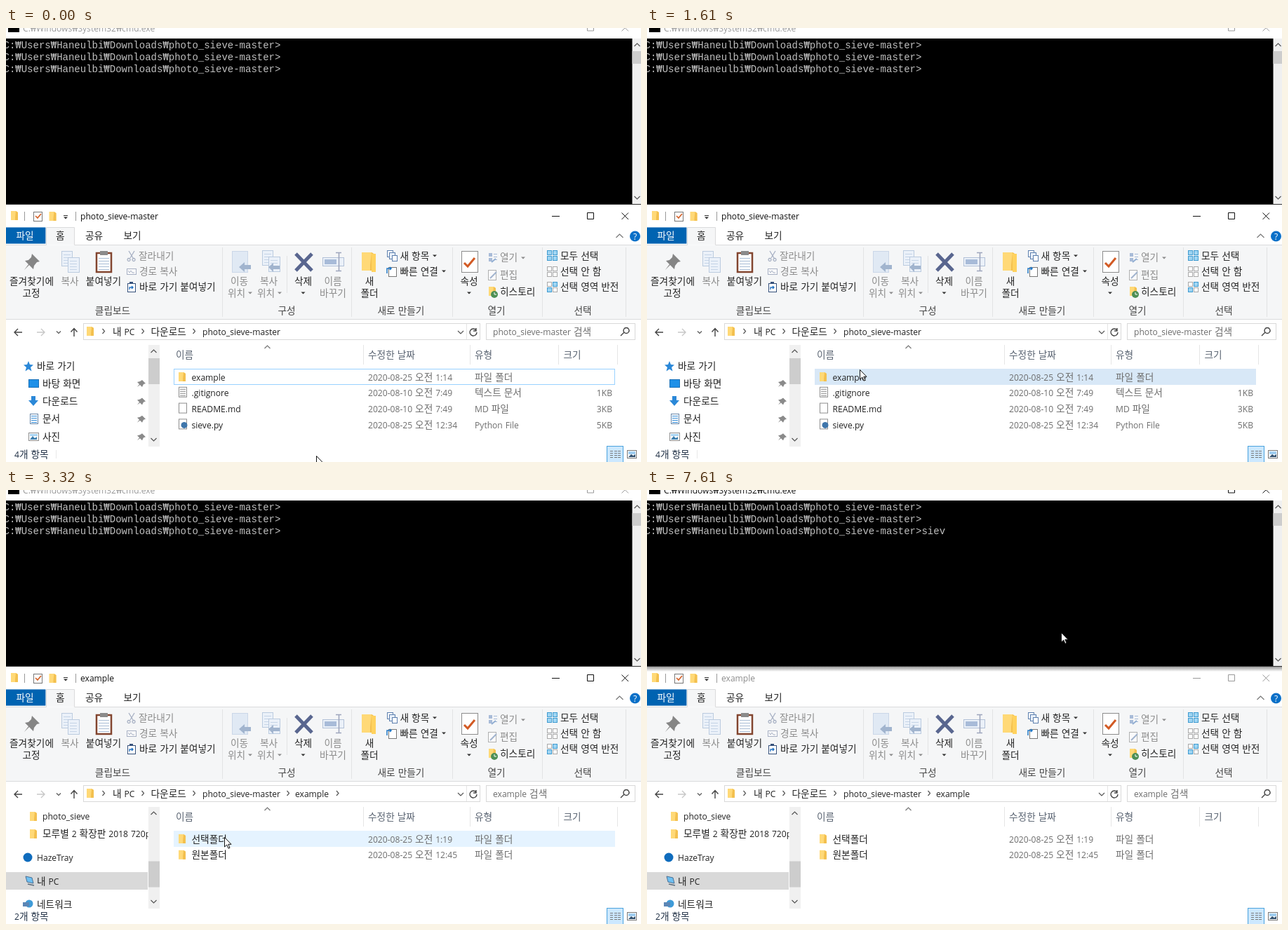
Animation of 905 by 619 pixels, one loop 7.99 s. Source, as an HTML page:

```html
<!DOCTYPE html>
<html lang="ko">
<head>
<meta charset="utf-8">
<title>photo_sieve</title>
<style>
html, body { margin: 0; width: 100%; height: 100%; overflow: hidden; background: #fff; }
svg { display: block; width: 905px; height: 619px; }
text { font: 12.1px "Open Sans", "Noto Sans", "Noto Sans CJK KR", sans-serif; word-spacing: .8px; white-space: pre; }
.k { font: 13.7px "Noto Sans CJK KR", "Noto Sans CJK", sans-serif; }
.con { font: 14px "Liberation Mono", monospace; word-spacing: 0; }
.won { font: 13.95px "DejaVu Sans Mono", monospace; }
text.dim { fill: #8b8b8b; }
g.dim { opacity: .55; }
.armed text.dim { fill: #222; }
.armed g.dim { opacity: 1; }
</style>
</head>
<body>
<svg id="stage" viewBox="0 0 905 619" xmlns="http://www.w3.org/2000/svg"></svg>
<script>
const stage = document.getElementById('stage');
const LOOP = 7990, STEP = 75;
const GRAY = '#6d6d6d', LINE = '#dadbdc', BLUE = '#2b88d8';

// Markup helpers
const R = (x, y, w, h, fill, stroke = 'none', extra = '') =>
  `<rect x="${x}" y="${y}" width="${w}" height="${h}" fill="${fill}" stroke="${stroke}" ${extra}/>`;
const P = (d, stroke = '#333', w = 1, fill = 'none') =>
  `<path d="${d}" stroke="${stroke}" stroke-width="${w}" fill="${fill}"/>`;
const C = (x, y, r, fill) => `<circle cx="${x}" cy="${y}" r="${r}" fill="${fill}"/>`;
const T = (x, y, s, fill = '#222', anchor = 'start', cls = '') =>
  `<text x="${x}" y="${y}" fill="${fill}" text-anchor="${anchor}" class="${cls}">` +
  s.replace(/[가-힣]+/g, '<tspan class="k">$&</tspan>') + '</text>';
const M = (x, y, s, cls = '') => T(x, y, s, '#222', 'middle', cls);
const G = (id, body) => `<g id="${id}">${body}</g>`;
const dim = body => `<g class="dim">${body}</g>`;
const vline = (x, y1, y2, c = '#e2e3e4') => P(`M${x + .5} ${y1}V${y2}`, c);
const chev = (x, y, dx, dy, c = '#555', w = 1.2) => dy
  ? P(`M${x - dx} ${y - dy}L${x} ${y}L${x + dx} ${y - dy}`, c, w)
  : P(`M${x - dx} ${y - 3.5}L${x} ${y}L${x - dx} ${y + 3.5}`, c, w);
const drop = (x, y, c = '#333') => P(`M${x - 3} ${y - 1.5}h6l-3 3z`, 'none', 0, c);
const folder = (x, y, s = 1) => `<g transform="translate(${x} ${y}) scale(${s})">` +
  P('M0 0H7L10 2V13H0Z', 'none', 0, '#ffd977') + P('M7 0L10 2V13H6V9Z', 'none', 0, '#f3c04f') + '</g>';
const page = (x, y, w, h, c = '#9a9a9a', fill = '#fff') =>
  R(x + .5, y + .5, w, h, fill, c);
const rules = (x, y, w, n, gap, c) =>
  P(Array.from({ length: n }, (_, i) => `M${x} ${y + i * gap + .5}h${w}`).join(''), c);
const sheets = (x, y) => page(x, y, 15, 21, '#8da9cc', '#e4eefb') + rules(x + 3, y + 5, 10, 4, 4, '#9fb9da') +
  page(x + 9, y + 9, 16, 21, '#8da9cc', '#e4eefb') + rules(x + 12, y + 14, 10, 4, 4, '#9fb9da');
const tiles = (y, colors) => colors.map((c, i) =>
  R(771.5 + i % 2 * 8, y + .5 + (i >> 1) * 8, 6, 6, c, c === '#fff' ? '#a9a9a9' : '#3f9bd0')).join('');
const winButtons = (c, dy) => P(`M828.5 ${263.5 + dy}h9v9h-9zM877.5 ${263.5 + dy}l9.5 9.5m0 -9.5l-9.5 9.5`, c);

function consoleWindow() {
  const head = c => T(24, 4.5, 'C:₩Windows₩System32₩cmd.exe', c) + winButtons(c, -268.5);
  return R(0, 0, 905, 15, '#fff') + R(3, -6, 16, 12, '#000') +
    G('headOff', head('#999')) + G('headOn', head('#111')) +
    R(0, 15, 905, 236.5, '#000') + R(892.5, 15, 13, 236.5, '#f0f0f0') + R(892.5, 33, 13, 18, '#cdcdcd') +
    chev(899.5, 22, 4, -4) + chev(899.5, 244, 4, 4) +
    [29, 45.5, 62.5].map((y, i) =>
      `<text class="con" x="-3.5" y="${y}" fill="#bfbfbf">` +
      'C:₩Users₩Haneulbi₩Downloads₩photo_sieve-master>'.replace(/₩/g, '<tspan class="won">₩</tspan>') +
      (i === 2 ? '<tspan id="typed"></tspan>' : '') + '</text>').join('') +
    R(391, 62, 8, 3, '#ccc', 'none', 'id="caret"');
}

function titleBar() {
  const name = s => ['On', 'Off'].map(k => G(s + k, T(106, 273, s === 'root' ? 'photo_sieve-master' : 'example',
    k === 'On' ? '#111' : '#8c8c8c'))).join('');
  const buttons = c => P('M778 268.5h11', c) + winButtons(c, 0);
  return folder(7, 261) + vline(26, 262, 275, '#999') + page(39, 262, 12, 13, '#777') +
    P('M42 268l3 3 5-6', '#d4622a', 1.7) + folder(61.5, 262) + P('M82 267.5h6', '#333') + drop(85, 271) +
    vline(99, 262, 275, '#999') + name('root') + name('sub') +
    G('btnOn', buttons('#111')) + G('btnOff', buttons('#999'));
}

function ribbon() {
  const label = '#444';
  let s = R(0, 284.4, 56.4, 23.2, '#0063b1') + T(14.5, 301, '파일', '#fff') +
    R(0, 310, 905, 105, '#f5f6f7') + P('M0 309.5H57.5V284.5H97.5V309.5H905M0 415.5H905', LINE, 1, '#f5f6f7') +
    T(71, 301, '홈') + T(113, 301, '공유') + T(167.5, 301, '보기') +
    chev(874.5, 294, 5, -5, '#777') + C(896.5, 297, 7.5, '#0a70c8') + T(896.5, 301.5, '?', '#fff', 'middle');
  s += [308, 492, 636, 764, 883].map(x => vline(x, 313, 412)).join('') + vline(400, 325, 378);
  s += [['클립보드', 152], ['구성', 400], ['새로 만들기', 563], ['열기', 699], ['선택', 822]]
    .map(([t, x]) => T(x, 408, t, label, 'middle')).join('');

  // Clipboard
  s += P('M37 322L48 333 44 334 40 339 39 344 33 338 26 345 32 337 27 332 32 331 36 327Z', 'none', 0, '#858585') +
    M(36.5, 366, '즐겨찾기에') + M(36, 382.5, '고정') +
    dim(sheets(79, 318)) + M(91, 366, '복사', 'dim') +
    R(129, 321, 21, 27, '#fff', '#82452f', 'stroke-width="2.5"') + R(134, 318, 11, 6, '#8b8b8b') +
    rules(132, 328, 15, 5, 4, '#a9bdd5') + M(139, 366, '붙여넣기') +
    dim(P('M175 318l6 10M183 318l-6 10', '#68789a', 1.3) + P('M175 328.5a2 2 0 1 0 .1 0zM182 328.5a2 2 0 1 0 .1 0z', '#68789a', 1.3)) +
    T(189, 330, '잘라내기', '#222', 'start', 'dim') +
    dim(page(172, 343, 13, 8, '#68789a') + P('M174 346l2 3 2-3 2 3h3', '#68789a')) +
    T(190, 352, '경로 복사', '#222', 'start', 'dim') +
    page(173, 364, 11, 12, '#35507a') + R(176, 362, 5, 3, '#35507a') + P('M176 373v-3h5m-2-2l2 2-2 2', '#1f6fc0', 1.3) +
    T(190, 374, '바로 가기 붙여넣기');

  // Organize
  s += dim(page(322, 318, 22, 30, '#a9bfdd', '#cfdff3') + P('M332 341l8-7v4h9v6h-9v4z', 'none', 0, '#5e7fae')) +
    M(332.5, 366, '이동', 'dim') + M(328.5, 382.5, '위치', 'dim') + dim(drop(348, 378)) +
    dim(sheets(365, 317) + P('M374 341l7-6v4h9v5h-9v4z', 'none', 0, '#5e7fae')) +
    M(374.5, 366, '복사', 'dim') + M(370.5, 382.5, '위치', 'dim') + dim(drop(390, 378)) +
    P('M413 322L436 346M436 322L413 346', '#59668f', 5) + M(423.5, 366, '삭제') + drop(423.5, 378) +
    dim(R(451.5, 327.5, 30, 12, '#e4eefb', '#7c97bd') + R(454, 330, 17, 7, '#6a8cc0') +
      P('M470 320.5h8M474.5 320v26M470 346.5h8', '#59668f', 1.6)) +
    M(466, 366, '이름', 'dim') + M(466, 382.5, '바꾸기', 'dim');

  // New
  s += folder(507, 320, 2) + P('M521 322h6v26h-6z', 'none', 0, '#ffd25f') + M(518, 366, '새') + M(518, 382.5, '폴더') +
    page(543, 317, 8, 9, '#5c7fae') + page(546, 320, 8, 9, '#5c7fae', '#e9f1fa') + page(550, 324, 7, 8, '#5c7fae') +
    T(561.5, 330, '새 항목') + drop(611, 325) +
    page(545, 341, 11, 13, '#777') + P('M543 350v-7h6m-2-2l2 2-2 2', '#1f78c8', 1.5) +
    T(561.5, 352, '빠른 연결') + drop(624, 347);

  // Open
  s += page(649, 318, 23, 30, '#8c8c8c') + P('M653 335l5 5 10-12', '#d25a24', 3) + M(660, 366, '속성') + drop(660, 378) +
    dim(R(688, 321, 5, 5, '#6a8cc0') + R(688, 328, 5, 5, '#6a8cc0') + rules(695, 322, 5, 3, 4, '#6a8cc0') +
      P('M692 334l6-5', '#4276b5', 2)) +
    T(704, 332, '열기', '#222', 'start', 'dim') + dim(drop(737, 328)) +
    `<g opacity=".55">${page(687, 345, 11, 14, '#777')}${P('M690 357l9-9', '#5e7fae', 2)}</g>` +
    T(704, 357, '편집', '#8b8b8b') + folder(688, 369) + C(696, 380, 5, '#4d8f55') + P('M696 377v3h3', '#fff') +
    T(704, 381, '히스토리');

  // Select
  s += tiles(317, ['#9fd5f3', '#9fd5f3', '#9fd5f3', '#9fd5f3']) + T(790, 330, '모두 선택') +
    tiles(340, ['#fff', '#fff', '#fff', '#fff']) + T(790, 352, '선택 안 함') +
    tiles(362, ['#fff', '#9fd5f3', '#9fd5f3', '#fff']) + T(790, 374, '선택 영역 반전');
  return s;
}

function addressBar() {
  const dark = '#444';
  return P('M23 434H12m5-5l-5 5 5 5', dark, 1.4) + P('M44 434h11m-5-5l5 5-5 5', '#c8c8c8', 1.4) +
    chev(75, 435.5, 3, 3) + P('M97 440V429m-4.5 4.5l4.5-5 4.5 5', dark, 1.4) +
    R(110.5, 421.5, 565, 23, '#fff', '#d9d9d9') + vline(656, 422, 444, '#e5e5e5') + folder(115, 426) +
    [140.5, 196.5, 269.5].map(x => chev(x, 432.5, 3, 0)).join('') +
    T(152, 437.5, '내 PC') + T(206.5, 437.5, '다운로드') + T(280, 437.5, 'photo_sieve-master') +
    G('crumb', chev(403.5, 432.5, 3, 0) + T(412, 437.5, 'example')) + G('crumbEnd', chev(474, 432.5, 3, 0)) +
    chev(648, 436, 4, 4) + P('M670 431a5 5 0 1 0 1 3m-1-6v4h-4', dark, 1.4) +
    R(684.5, 421.5, 212, 23, '#fff', '#d9d9d9') +
    G('findRoot', T(694, 437.5, 'photo_sieve-master 검색', GRAY)) + G('findSub', T(694, 437.5, 'example 검색', GRAY)) +
    P('M881 434l-5 5M884 427.5a4 4 0 1 0 .1 0z', dark, 1.4);
}

function fileList() {
  const row = (i, [name, date, type, size = ''], icon) => {
    const y = 502.5 + i * 22.8;
    return icon(i * 22.8) + T(264.5, y, name) + T(516, y, date, GRAY) + T(668, y, type, GRAY) + T(864, y, size, GRAY, 'end');
  };
  const dir = y => folder(246, 491 + y);
  const doc = y => page(246, 489 + y, 11, 14, '#8e8e8e');
  const txt = y => doc(y) + rules(248, 492 + y, 8, 4, 3, '#8e8e8e');
  const py = y => doc(y) + C(254, 498 + y, 4.5, '#3f76ab');
  const name = '#5a6472';
  return R(224, 452, 285, 28, '#d9ebf9', 'none', 'id="headHover"') +
    [509, 661, 787, 871].map(x => vline(x, 452, 480, '#e5e5e5')).join('') + chev(372.5, 453, 4, -4, '#777') +
    T(242, 470.5, '이름', name) + T(516, 470.5, '수정한 날짜', name) + T(668, 470.5, '유형', name) + T(794.5, 470.5, '크기', name) +
    R(239, 486, 629, 23, '#e5f3ff', 'none', 'id="rowHover"') +
    R(239.5, 486.5, 628, 22, 'none', '#99d1ff', 'id="focus"') +
    G('rootFiles', row(0, ['example', '2020-08-25 오전 1:14', '파일 폴더'], dir) +
      row(1, ['.gitignore', '2020-08-10 오전 7:49', '텍스트 문서', '1KB'], txt) +
      row(2, ['README.md', '2020-08-10 오전 7:49', 'MD 파일', '3KB'], doc) +
      row(3, ['sieve.py', '2020-08-25 오전 12:34', 'Python File', '5KB'], py)) +
    G('subFiles', row(0, ['선택폴더', '2020-08-25 오전 1:19', '파일 폴더'], dir) +
      row(1, ['원본폴더', '2020-08-25 오전 12:45', '파일 폴더'], dir));
}

function sidebar() {
  const pin = y => `<g transform="translate(193 ${y})">` + P('M1-5l5 5-3 1-2 4-3-3-4 3 3-4-3-3 4-1z', 'none', 0, '#8a8a8a') + '</g>';
  const quick = P('M32 475l2 5 5 .5-4 3.5 1.5 5.5-4.5-3-4.5 3 1.5-5.5-4-3.5 5-.5z', 'none', 0, BLUE) + T(44, 486.5, '바로 가기') +
    R(32.5, 501.5, 14, 11, '#1e90e8', '#1870b8') + P('M36 525h6v6h4l-7 8-7-8h4z', 'none', 0, BLUE) +
    page(34, 550, 11, 14, '#6886a8') + rules(36, 553, 8, 4, 3, BLUE) +
    page(32, 577, 14, 11, '#8e8e8e') + P('M34 587l4-5 3 3 3-2v4z', 'none', 0, '#3d7fae') + R(34, 579, 11, 3, '#a9d4f2') +
    ['바탕 화면', '다운로드', '문서', '사진'].map((t, i) => T(52, 511.5 + i * 25.4, t) + pin(507 + i * 25.4)).join('');
  const tree = folder(34, 459) + T(52, 470, 'photo_sieve') + folder(34, 484) + T(52, 495, '모루별 2 확장판 2018 720p') +
    C(31, 524, 6.5, '#0f6cbd') + T(44, 528.5, 'HazeTray') +
    R(0, 545, 202, 25, '#d9d9d9') + P('M28 551l9 2 2 8-9-2z', '#4a6e92', 1, '#6ec0f2') + P('M31 562l9 2', '#5b6b7b', 1.5) +
    T(44, 562.5, '내 PC') + C(33, 590, 5.5, '#3f9bd8') + R(24, 588, 9, 6, '#5c86b5') + T(44, 596, '네트워크');
  return '<clipPath id="navClip"><rect y="452" width="202.5" height="147"/></clipPath><g clip-path="url(#navClip)">' +
    G('quick', quick) + G('tree', tree) + '</g>' + R(203, 452, 16, 145, '#f0f0f0') +
    R(203, 471, 16, 37, '#cdcdcd', 'none', 'id="thumb"') + chev(210.5, 459, 4, -4) + chev(210.5, 589, 4, 4);
}

function statusBar() {
  const c = '#1f2f44';
  return G('count4', T(12, 612.5, '4개 항목', c) + vline(71, 602, 614, '#e8e8e8')) + G('count2', T(12, 612.5, '2개 항목', c)) +
    G('picked', T(82, 612.5, '1개 항목 선택함', c)) +
    R(856.5, 596.5, 23, 23, '#cce8ff', '#4ba3dd') +
    rules(861, 603, 4, 4, 3, '#777') + rules(867, 603, 4, 4, 3, '#777') + rules(872, 603, 4, 4, 3, '#777') +
    page(885, 602, 13, 11, '#777') + R(887, 604, 10, 4, '#9fcdf0') + P('M887 612l4-4 3 2 3-2v4z', 'none', 0, '#31506e');
}

stage.innerHTML = '<defs><linearGradient id="fade" x2="0" y2="1"><stop stop-color="#999"/>' +
  '<stop offset="1" stop-color="#999" stop-opacity="0"/></linearGradient></defs>' +
  R(0, 0, 905, 619, '#fff') + consoleWindow() + P('M0 251.5H905', '#333') +
  titleBar() + ribbon() + addressBar() + fileList() + sidebar() + statusBar() +
  R(0, 252, 905, 7, 'url(#fade)', 'none', 'id="shadow"') +
  G('pointer', '<circle id="press" r="12.5" fill="#f5e02a" opacity=".7"/>' +
    P('M.5.5V14L3.7 11 6 16.2 8 15.3 5.8 10.3H10Z', '#111', 1, '#fff'));

const el = Object.fromEntries([...stage.querySelectorAll('[id]')].map(e => [e.id, e]));
const show = (ids, on) => ids.split(' ').forEach(id => el[id].style.display = on ? '' : 'none');
const within = (t, ...spans) => spans.some(([a, b]) => t >= a && t < b);

// Pointer moves: start time, steps, end x, end y
const moves = [
  [130, 1, 443, 610], [830, 3, 360, 537], [1055, 4, 300, 472], [1610, 1, 303, 487], [1690, 2, 309, 495],
  [2770, 1, 310, 495], [3320, 1, 311, 495], [3700, 7, 520, 132], [4870, 5, 557, 193],
  [5420, 3, 563, 197], [5900, 6, 589, 203], [6750, 1, 590, 203]
];
function pointerAt(t) {
  let x = 442, y = 610;
  for (const [start, n, tx, ty] of moves) {
    if (t < start) break;
    const k = Math.min(n, Math.floor((t - start) / STEP) + 1) / n;
    x += (tx - x) * k;
    y += (ty - y) * k;
  }
  return [Math.round(x), Math.round(y)];
}

function render(t) {
  const [x, y] = pointerAt(t);
  const sub = t >= 2690, moved = t >= 2850, active = t >= 4480;
  const selected = within(t, [1840, 2690]);

  el.pointer.setAttribute('transform', `translate(${x} ${y})`);
  show('press', within(t, [1840, 2060], [2390, 2540], [4410, 4580]));
  show('headOn btnOff shadow', active);
  show('headOff btnOn', !active);
  show('rootOn', !sub);
  show('rootOff', false);
  show('subOn', sub && !active);
  show('subOff', active);
  show('rootFiles findRoot count4', !sub);
  show('subFiles findSub count2 crumb', sub);
  show('crumbEnd', within(t, [3160, 4480]));
  show('quick', !moved);
  show('tree', moved);
  show('picked', selected);
  el.thumb.setAttribute('y', moved ? 529.5 : 471);
  stage.classList.toggle('armed', within(t, [2465, 2690]));

  const row = Math.floor((y - 486) / 23);
  const over = x >= 239 && x < 868 && row >= 0 && row < (sub ? 2 : 4);
  show('headHover', x < 509 && y >= 452 && y < 480);
  show('rowHover', over);
  el.rowHover.setAttribute('y', 486 + row * 23);
  el.rowHover.setAttribute('fill', !sub && row === 0 ? '#d8e8f7' : '#e5f3ff');
  show('focus', !sub && (selected || !(over && row === 0)));
  el.focus.setAttribute('fill', selected ? '#cce8ff' : 'none');

  const typed = [6600, 6750, 7210, 7530].filter(k => t >= k).length;
  el.typed.textContent = 'siev'.slice(0, typed);
  el.caret.setAttribute('x', 391 + 8.4 * typed);
  show('caret', within(t, [4870, 5420], [5960, 6520], [6600, 6750], [7060, 7610]));
}

const begin = performance.now();
(function tick() {
  render((performance.now() - begin) % LOOP);
  requestAnimationFrame(tick);
})();
</script>
</body>
</html>
```
